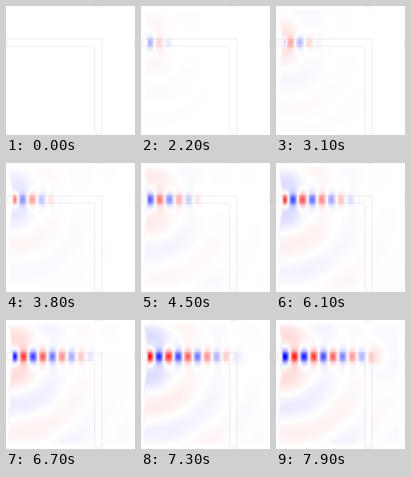
These frames come from a looping animation (162x162 px, 8000 ms). An HTML page with a canvas:

```html
<!DOCTYPE html>
<html lang="en">
<head>
<meta charset="utf-8">
<title>Wave in a bent waveguide</title>
<style>
  html, body { margin: 0; width: 100%; height: 100%; overflow: hidden; background: #fff; }
  canvas { display: block; width: 100vw; height: 100vh; }
</style>
</head>
<body>
<canvas id="stage" width="162" height="162"></canvas>
<script>
const SIZE = 162, N = SIZE - 1;          // pixels and field nodes per side
const FRAMES = 80, FRAME_MS = 100;
const DX = 0.1, DT = 0.05, STEPS = 12;   // grid, time step, steps per picture
const PERIOD = 6.85;

// The L-shaped guide, repeated periodically beyond the cell.
function inGuide(x, y) {
  const px = (x + 159) % 160, py = (y + 159) % 160;
  const across = py >= 40 && py < 50 && px < 120;
  const down = px >= 110 && px < 120 && py >= 40;
  return across || down ? 1 : 0;
}

function onOutline(x, y) {
  const outside = (a, b) => a >= 0 && b >= 0 && a < SIZE && b < SIZE && !inGuide(a, b);
  return inGuide(x, y) &&
    (outside(x - 1, y) || outside(x + 1, y) || outside(x, y - 1) || outside(x, y + 1));
}

// Absorbing layer one unit thick: decay and gain factors at grid position p.
function absorb(p) {
  const depth = Math.max(0, 1 - Math.min(p, 160 - p) * DX);
  const loss = 25 * depth * depth * DT / 2;
  return [(1 - loss) / (1 + loss), DT / DX / (1 + loss)];
}

// Slow turn-on of the current.
const drive = t => Math.tanh(t / 60) * (1 - Math.exp(-t / 6)) * Math.cos(2 * Math.PI * t / PERIOD);

// Finite-difference Maxwell equations for Ez with split-field absorption.
function simulate() {
  const field = () => new Float64Array(N * N);
  const ez = field(), ezx = field(), ezy = field(), hx = field(), hy = field(), inv = field();
  const node = Array.from({ length: N }, (_, i) => absorb(i));
  const half = Array.from({ length: N }, (_, i) => absorb(i + 0.5));
  const keep = Float64Array.from(node, c => c[0]), gain = Float64Array.from(node, c => c[1]);
  const keepH = Float64Array.from(half, c => c[0]), gainH = Float64Array.from(half, c => c[1]);

  for (let y = 0; y < N; y++) for (let x = 0; x < N; x++) {
    const fill = inGuide(x, y) + inGuide(x + 1, y) + inGuide(x, y + 1) + inGuide(x + 1, y + 1);
    inv[y * N + x] = 1 / (1 + 11 * fill / 4);
  }

  function step(t) {
    for (let y = 0; y < N - 1; y++) for (let x = 0; x < N - 1; x++) {
      const k = y * N + x;
      hx[k] = keepH[y] * hx[k] - gainH[y] * (ez[k + N] - ez[k]);
      hy[k] = keepH[x] * hy[k] + gainH[x] * (ez[k + 1] - ez[k]);
    }
    for (let y = 1; y < N - 1; y++) for (let x = 1; x < N - 1; x++) {
      const k = y * N + x;
      ezx[k] = keep[x] * ezx[k] + gain[x] * inv[k] * (hy[k] - hy[k - 1]);
      ezy[k] = keep[y] * ezy[k] - gain[y] * inv[k] * (hx[k] - hx[k - N]);
    }
    const current = drive(t) * DT / DX;
    for (let y = 40; y <= 50; y++) {
      const k = y * N + 10;
      ezx[k] -= current * inv[k] * (y === 40 || y === 50 ? 0.5 : 1);
    }
    for (let k = 0; k < ez.length; k++) ez[k] = ezx[k] + ezy[k];
  }

  // Pixel centres lie between four nodes.
  function snapshot() {
    const out = new Float32Array(SIZE * SIZE);
    for (let y = 1; y < N; y++) for (let x = 1; x < N; x++) {
      const k = y * N + x;
      out[y * SIZE + x] = (ez[k] + ez[k - 1] + ez[k - N] + ez[k - N - 1]) / 4;
    }
    return out;
  }

  const shots = [];
  for (let f = 0, n = 0; f < FRAMES; f++) {
    for (let s = 0; s < STEPS; s++, n++) step((n + 0.5) * DT);
    shots.push(snapshot());
  }
  return shots;
}

const ctx = document.getElementById('stage').getContext('2d');
const image = ctx.createImageData(SIZE, SIZE);
const shade = Float32Array.from({ length: SIZE * SIZE },
  (_, k) => onOutline(k % SIZE, Math.floor(k / SIZE)) ? 0.93 : 1);
const shots = simulate();

// Scale the colours by the crest in the guide in the last picture.
let crest = 0;
for (let x = 28; x < 46; x++) crest = Math.max(crest, Math.abs(shots[FRAMES - 1][46 * SIZE + x]));
const scale = 0.87 / crest;

// Dark blue, blue, white, red, dark red.
function paint(values) {
  const px = image.data;
  for (let k = 0; k < values.length; k++) {
    const v = values[k] * scale, level = Math.abs(v);
    const main = 255 * shade[k] * (level > 1 ? Math.max(0.3, 1.7 - 0.7 * level) : 1);
    const rest = 255 * shade[k] * Math.max(0, 1 - level);
    px[4 * k] = v > 0 ? main : rest;
    px[4 * k + 1] = rest;
    px[4 * k + 2] = v > 0 ? rest : main;
    px[4 * k + 3] = 255;
  }
  ctx.putImageData(image, 0, 0);
}

function draw() {
  paint(shots[Math.floor(performance.now() / FRAME_MS) % FRAMES]);
  requestAnimationFrame(draw);
}
draw();
</script>
</body>
</html>
```
